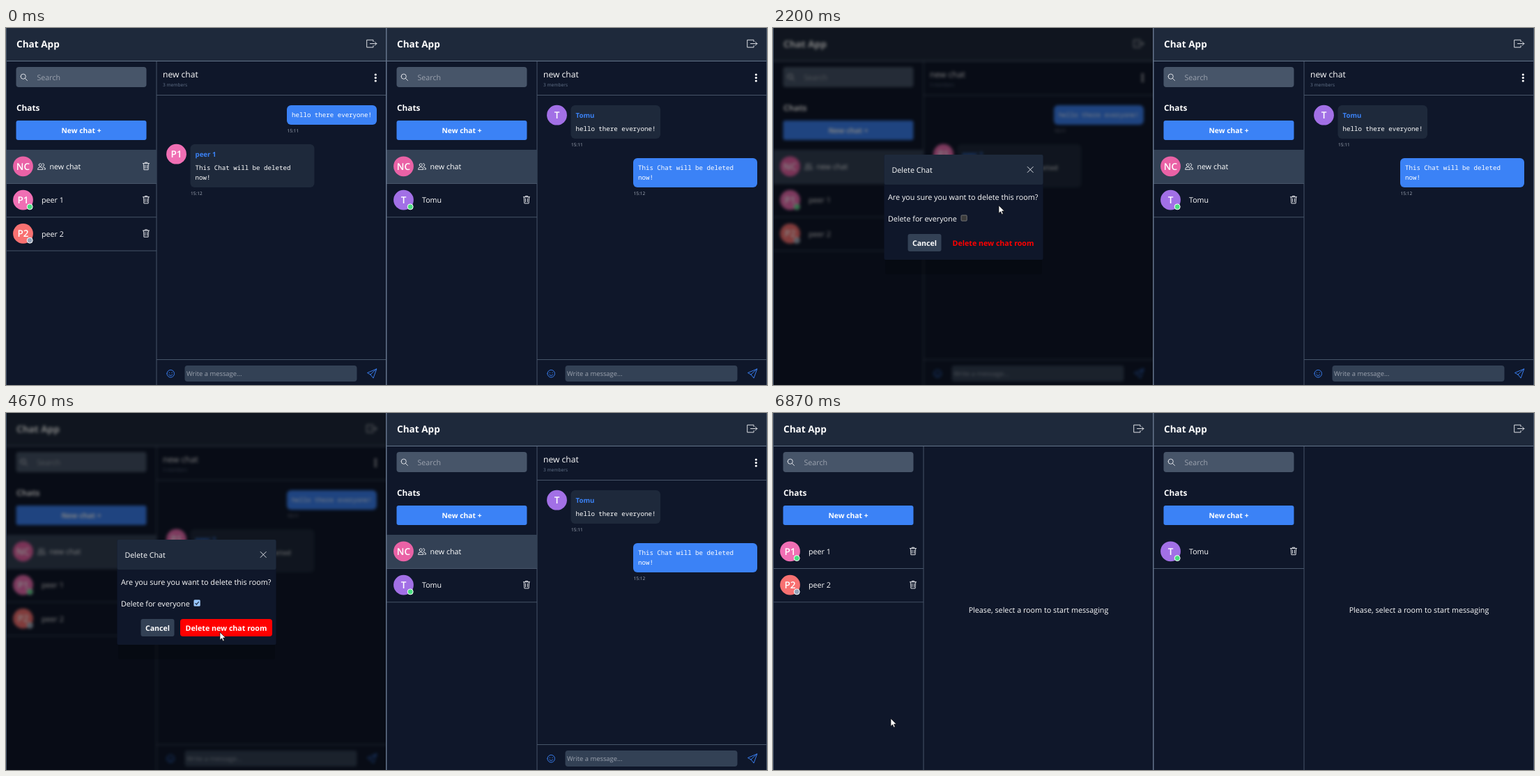
Recreate the animation shown at these times as an HTML page. Size 1092 px wide and 513 px high, loop 7590 ms.

```html
<!DOCTYPE html>
<html lang="en">
<head>
<meta charset="utf-8">
<title>Chat App</title>
<style>
html, body { margin: 0; width: 100%; height: 100%; overflow: hidden; background: #0f172a; }
svg { display: block; width: 1092px; height: 513px; }
text { font-family: "Open Sans", "Noto Sans", sans-serif; fill: #fff; text-rendering: geometricPrecision; white-space: pre; }
.b { font-weight: 700; }
.s { font-weight: 600; }
.m { text-anchor: middle; }
.mono { font-family: "Noto Sans Mono", "DejaVu Sans Mono", monospace; font-weight: 500; }
.muted { fill: #9ca3af; }
.dim { fill: #64748b; }
.time { fill: #a8b0bd; }
.blue { fill: #3b82f6; }
.item { fill: #c3c7da; }
.red { fill: #ef4444; }
.alert { fill: #f00; }
.line { fill: none; stroke: #e5e7eb; stroke-width: .95; stroke-linecap: round; stroke-linejoin: round; }
.line.sky { stroke: #3b82f6; }
.line.rose { stroke: #ef4444; }
.line.soft { stroke: #c3c7da; }

/* one 7590 ms loop drives everything */
.old, .new, .rest, .menu, .hover, .tick, .hot, .hand, .arrow { animation: 7590ms step-end infinite; }
.left .old { animation-name: goneL; }
.left .new { animation-name: shownL; }
.left .rest { animation-name: upL; }
.right .old { animation-name: goneR; }
.right .new { animation-name: shownR; }
.right .rest { animation-name: upR; }
.menu { animation-name: menu; }
.hover { animation-name: hover; }
.tick { animation-name: tick; }
.hot { animation-name: hot; }
.hand { animation-name: hand; }
.arrow { animation-name: arrow; }
.left { animation: dim 7590ms linear infinite; }
.dialog { animation: dialog 7590ms linear infinite; }
.cursor { animation: move 7590ms linear infinite; }

@keyframes goneL { 0% { opacity: 1 } 64%, 100% { opacity: 0 } }
@keyframes shownL { 0% { opacity: 0 } 64%, 100% { opacity: 1 } }
@keyframes upL { 0% { transform: none } 64%, 100% { transform: translateY(-48.3px) } }
@keyframes goneR { 0% { opacity: 1 } 72.8%, 100% { opacity: 0 } }
@keyframes shownR { 0% { opacity: 0 } 72.8%, 100% { opacity: 1 } }
@keyframes upR { 0% { transform: none } 72.8%, 100% { transform: translateY(-48.3px) } }
@keyframes menu { 0%, 22%, 100% { opacity: 0 } 12.25% { opacity: 1 } }
@keyframes hover {
  0%, 100% { opacity: 0 }
  13.6% { opacity: 1; transform: none }
  14.3% { opacity: 1; transform: translateY(24.5px) }
  16.1% { opacity: 0; transform: translateY(24.5px) }
  16.9% { opacity: 1; transform: translateY(75.5px) }
}
@keyframes tick { 0%, 100% { opacity: 0 } 48.5% { opacity: 1 } }
@keyframes hot { 0%, 100% { opacity: 0 } 50.65% { opacity: 1 } }
@keyframes hand { 0%, 22.3%, 100% { opacity: 0 } 10.1% { opacity: 1 } }
@keyframes arrow { 0%, 22.3%, 100% { opacity: 1 } 10.1% { opacity: 0 } }
@keyframes dim {
  0%, 22%, 64%, 100% { filter: none }
  24%, 62.4% { filter: blur(2px) brightness(.52) }
}
@keyframes dialog { 0%, 22%, 64%, 100% { opacity: 0 } 24%, 62.4% { opacity: 1 } }
@keyframes move {
  0%, .92% { transform: translate(1100px, 520px) }
  1% { transform: translate(1086px, 504px); animation-timing-function: ease-in }
  5.27% { transform: translate(800px, 170px) }
  8.43% { transform: translate(550px, 20px); animation-timing-function: ease-out }
  10.54%, 12.25% { transform: translate(527px, 70px) }
  14.8%, 15.8% { transform: translate(523px, 147px) }
  17.1% { transform: translate(500px, 190px); animation-timing-function: ease-out }
  19.37%, 22% { transform: translate(430px, 194px); animation-timing-function: ease-in-out }
  28.9%, 29.8% { transform: translate(324px, 255px) }
  31.62%, 32.5% { transform: translate(298px, 258px); animation-timing-function: ease-in-out }
  36.9% { transform: translate(196px, 294px); animation-timing-function: ease-out }
  41.24% { transform: translate(202px, 276px) }
  43%, 43.9% { transform: translate(204px, 275px); animation-timing-function: ease-in-out }
  47.4%, 48.7% { transform: translate(271px, 272px) }
  52.7% { transform: translate(320px, 322px) }
  53.6%, 62.3% { transform: translate(307px, 315px); animation-timing-function: ease-in-out }
  71.1% { transform: translate(441px, 395px) }
  72.8%, 73.7% { transform: translate(443px, 397px) }
  74.8% { transform: translate(393px, 384px); animation-timing-function: ease-in }
  79% { transform: translate(780px, 250px); animation-timing-function: ease-out }
  82.6%, 83.4% { transform: translate(887px, 157px); animation-timing-function: ease-in-out }
  88.3% { transform: translate(205px, 445px); animation-timing-function: ease-out }
  90.4%, 100% { transform: translate(169px, 439px) }
}
</style>
</head>
<body>
<svg id="stage" viewBox="0 0 1092 513"></svg>
<script>
const ROW = 48.3;
const text = (x, y, size, str, cls = "") =>
  `<text x="${x}" y="${y}" font-size="${size}" class="${cls}">${str}</text>`;
const rect = (x, y, w, h, fill, r = 0, more = "") =>
  `<rect x="${x}" y="${y}" width="${w}" height="${h}" rx="${r}" fill="${fill}" ${more}/>`;
const dot = (x, y, r, fill, more = "") =>
  `<circle cx="${x}" cy="${y}" r="${r}" fill="${fill}" ${more}/>`;
const icon = (x, y, d, cls = "") =>
  `<path transform="translate(${x} ${y})" d="${d}" class="line ${cls}"/>`;
const group = (cls, ...parts) => `<g class="${cls}">${parts.join("")}</g>`;

const ring = (r, x = 0, y = 0) => `M${x - r} ${y}a${r} ${r} 0 1 0 ${2 * r} 0a${r} ${r} 0 1 0 ${-2 * r} 0`;
const icons = {
  trash: "M-4.5-4h9M-1.7-4v-1.3h3.4V-4M-3.7-4l.6 9.2h6.2l.6-9.2M-1.5-1.7l.1 4.7M1.5-1.7l-.1 4.7",
  exit: "M2.5-3v-2.3h-9.3v10.6h9.3V3M-2 0H7.3M4.7-2.6 7.3 0 4.7 2.6",
  search: ring(3.6, -.8, -.8) + "M2 2 5 5",
  people: ring(2, -1.8, -2.2) + "M-5.5 4q0-3.2 3.7-3.2T1.9 4zM1.5-4.2a2 2 0 1 1 .5 4M2.5.9q3.2.3 3.2 3.1H3.6",
  smile: ring(5.3) + "M-2.6 1.4q2.6 2.8 5.2 0M-1.9-1.6v.4M1.9-1.6v.4",
  send: "M6.5-6.5-6.5-1-2 1.5 1.8 6.3zM6.5-6.5-2 1.5",
  info: ring(4.6) + "M0-.6V2.4M0-2.3v.1",
  sliders: "M-4.5-3h5M3.3-3h1.2M-4.5 0h1.6M0 0h4.5M-4.5 3h5M3.3 3h1.2" + ring(1.2, 1.9, -3) + ring(1.2, -1.5) + ring(1.2, 1.9, 3),
  close: "M-4-4 4 4M4-4-4 4"
};

const avatar = (x, y, label, fill) =>
  dot(x, y, 14.4, fill) + text(x, y + 5, 13.6, label, "s m");

const peers = {
  p1: { name: "peer 1", label: "P1", fill: "#f06fb4", state: "#4ade80" },
  p2: { name: "peer 2", label: "P2", fill: "#f87171", state: "#94a3b8" },
  t: { name: "Tomu", label: "T", fill: "#a270e6", state: "#4ade80" }
};

function peerRow(p, i) {
  const y = 198.8 + i * ROW;
  return avatar(24.5, y, p.label, p.fill) +
    dot(34.2, y + 9.8, 4, p.state, 'stroke="#fff"') +
    text(51, y + 4.2, 10.7, p.name) + icon(201, y - .3, icons.trash) +
    rect(0, 223 + i * ROW, 216, 1, "#475569");
}

function sidebar(list, canDelete) {
  return rect(14.5, 56, 187, 29, "#475569", 4) + icon(25.5, 70.5, icons.search) +
    text(44.5, 75, 10.7, "Search", "muted") +
    text(15, 119.3, 11.8, "Chats", "b") +
    rect(14.5, 133, 187, 28, "#3b82f6", 3) + text(108, 151, 10.3, "New chat +", "b m") +
    group("old",
      rect(0, 175, 216, 48, "#334155"), rect(0, 223, 216, 1, "#475569"),
      avatar(24.5, 198.8, "NC", "#ea62a6"), icon(51, 199, icons.people),
      text(62.5, 203, 10.7, "new chat"),
      canDelete ? icon(201, 198.5, icons.trash) : "") +
    group("rest", ...list.map((p, i) => peerRow(p, i + 1)));
}

function bubble(x, y, w, h, lines, time, from) {
  const first = y + (from ? 37 : 17);
  return rect(x, y, w, h, from ? "#1e293b" : "#3b82f6", 6) +
    (from ? avatar(x - 20, y + 14.2, from.label, from.fill) + text(x + 7, y + 18, 9.7, from.name, "b blue") : "") +
    lines.map((s, i) => text(x + 7, first + i * 14.3, 9.13, s, "mono")).join("") +
    text(x + .5, y + h + 10.8, 6.5, time, "time");
}

function panel(side, list, canDelete, messages) {
  return group(side,
    rect(-20, -20, 586, 553, "#0f172a"),
    rect(-20, -20, 586, 67, "#1e293b"), rect(-20, 47, 586, 1, "#64748b"),
    text(15, 28.2, 13.6, "Chat App", "b"), icon(524.5, 22.5, icons.exit),
    rect(215.5, 48, 1, 485, "#475569"),
    sidebar(list, canDelete),
    group("old",
      text(225, 71, 12.1, "new chat"), text(225, 84, 6.6, "3 members", "dim"),
      [67, 71.5, 76].map(y => dot(530.3, y, 1.6, "#fff")).join(""),
      rect(216, 96, 350, 1, "#475569"), messages,
      rect(216, 476, 350, 1, "#475569"),
      icon(236.2, 496.7, icons.smile, "sky"),
      rect(256.5, 485, 247, 23, "#334155", 4),
      text(259, 499.5, 9.4, "Write a message...", "muted"),
      icon(525, 496.5, icons.send, "sky")),
    group("new", text(381, 287, 10.77, "Please, select a room to start messaging", "m")));
}

const hello = ["hello there everyone!"], notice = ["This Chat will be deleted", "now!"];
const left = panel("left", [peers.p1, peers.p2], true,
  bubble(403, 111, 129, 28, hello, "15:11") +
  bubble(264.5, 167, 178, 62, notice, "15:12", peers.p1));
const right = panel("right", [peers.t], false,
  bubble(264.5, 111, 128.5, 48, hello, "15:11", peers.t) +
  bubble(354, 187, 178, 42, notice, "15:12"));

const menu = group("menu",
  rect(417.5, 84.5, 120, 126, "#0c1147", 2, 'stroke="#2a3560"'),
  rect(420, 107.5, 114, 25, "#22274f", 2, 'class="hover"'),
  text(428.5, 101.2, 8, "Main", "s muted"),
  icon(433.7, 120, icons.info, "soft"), text(445.5, 123.8, 9.5, "View room info", "item"),
  icon(433.7, 145, icons.sliders, "soft"), text(445.5, 148.5, 9.55, "Manage group", "item"),
  rect(420, 159.5, 114, 1, "#2a3560"),
  text(428.5, 176, 8, "Additional", "s muted"),
  icon(433.7, 195, icons.trash, "rose"), text(445.5, 199.2, 9.45, "Delete and leave", "red"));

const dialog = group("dialog",
  rect(161, 330, 225, 24, "#000", 3, 'opacity=".15"'),
  rect(159.5, 182, 228, 151, "#0f172a", 2), rect(159.5, 182, 228, 43, "#1e293b", 2),
  text(170.5, 208, 10.75, "Delete Chat"), icon(369.2, 203.5, icons.close),
  text(165, 246.5, 10.8, "Are you sure you want to delete this room?"),
  text(165, 277.5, 10.76, "Delete for everyone"),
  rect(270, 269, 8.2, 8.2, "#3b3b3b", 1.2, 'stroke="#858585" stroke-width=".8"'),
  group("tick", rect(269.6, 268.6, 9, 9, "#99c8ff", 1.2),
    '<path d="M271.6 273.2l1.8 1.9 3.3-4" fill="none" stroke="#26364f" stroke-width="1.4"/>'),
  rect(193.5, 296, 48, 25, "#334155", 3), text(217.5, 313.2, 10.6, "Cancel", "b m"),
  text(316, 313.2, 10.65, "Delete new chat room", "b m alert"),
  group("hot", rect(250, 296, 132, 25, "#f00", 4),
    text(316, 313.2, 10.65, "Delete new chat room", "b m")));

const cursor = group("cursor",
  '<path class="arrow" d="M0 0V11.2L2.6 8.8 4.4 12.8 6.2 12 4.5 8.1H8z" fill="#fff" stroke="#111" stroke-width=".7"/>',
  '<path class="hand" d="M-1.2.8C-1.2-.6 1.2-.6 1.2.8V5l4 .9q1.8.5 1.6 2.4L6 12.5V15H-.5v-1.8L-3.8 9q-1-1.6.8-1.9l1.8 1.3z" fill="#fff" stroke="#111" stroke-width=".8"/>');

document.getElementById("stage").innerHTML =
  `<clipPath id="half"><rect width="546" height="513"/></clipPath>
  <g clip-path="url(#half)">${left}</g>
  <g transform="translate(546 0)"><g clip-path="url(#half)">${right}</g></g>` +
  rect(0, 0, 1, 513, "#475569") + rect(545, 0, 1.5, 513, "#64748b") + rect(1091, 0, 1, 513, "#475569") +
  menu + dialog + cursor;
</script>
</body>
</html>
```
